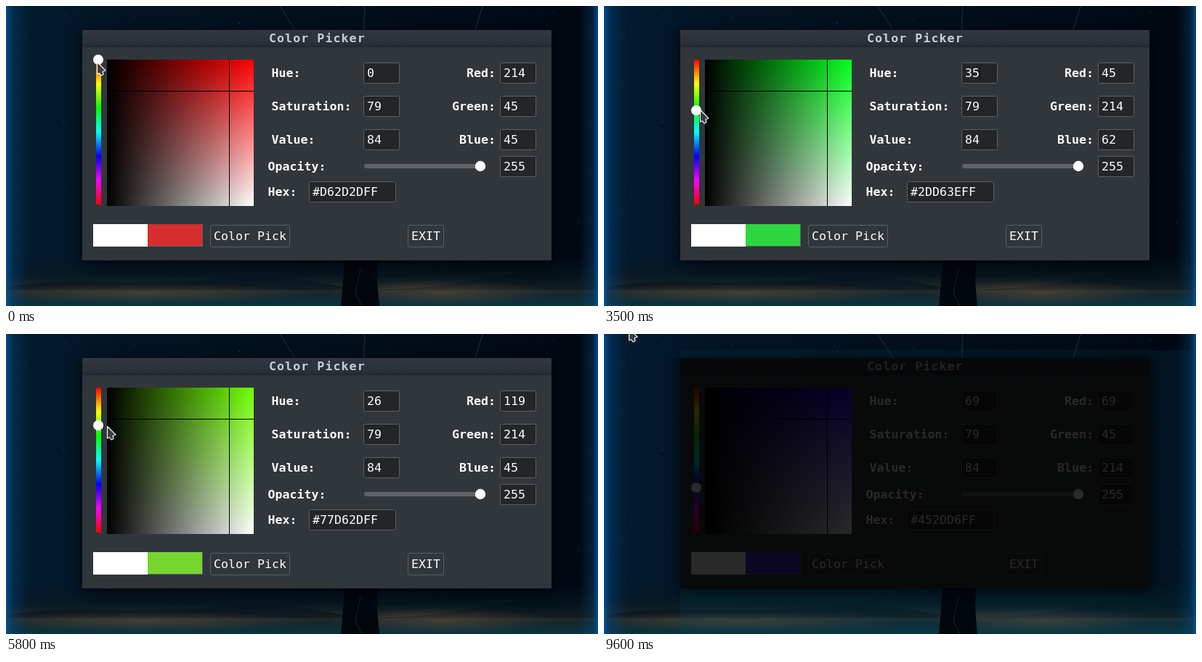
An HTML page that plays this animation: 815 by 414 pixels, repeating every 9.8 s.

```html
<!DOCTYPE html>
<html lang="en">
<head>
<meta charset="utf-8">
<title>Color Picker</title>
<style>
html, body { margin: 0; width: 100%; height: 100%; overflow: hidden; background: #010c18; }
svg { display: block; }
text { font: 16.6px "DejaVu Sans Mono", monospace; fill: #fcfcfc; white-space: pre; }
.b { font-weight: bold; }
.title { font-weight: bold; letter-spacing: 1.07px; fill: #c8cfdb; }
</style>
</head>
<body>
<svg width="815" height="414" viewBox="0 0 815 414">
  <defs>
    <linearGradient id="sky">
      <stop offset="0" stop-color="#021b30"/><stop offset=".2" stop-color="#021424"/>
      <stop offset=".65" stop-color="#020d19"/><stop offset="1" stop-color="#010812"/>
    </linearGradient>
    <linearGradient id="edge">
      <stop offset="0" stop-color="#07549a" stop-opacity=".85"/>
      <stop offset=".3" stop-color="#05457c" stop-opacity=".4"/>
      <stop offset="1" stop-color="#05457c" stop-opacity="0"/>
    </linearGradient>
    <linearGradient id="ground" x2="0" y2="1">
      <stop offset="0" stop-color="#03131d" stop-opacity="0"/>
      <stop offset=".45" stop-color="#0a1a20" stop-opacity=".7"/>
      <stop offset=".68" stop-color="#262a28"/>
      <stop offset=".8" stop-color="#12272f"/>
      <stop offset="1" stop-color="#0a3440"/>
    </linearGradient>
    <radialGradient id="warm">
      <stop offset="0" stop-color="#6b5440" stop-opacity=".5"/>
      <stop offset="1" stop-color="#6b5440" stop-opacity="0"/>
    </radialGradient>
    <linearGradient id="bar" x2="0" y2="1">
      <stop offset="0" stop-color="#31353f"/><stop offset=".7" stop-color="#2d313b"/>
      <stop offset="1" stop-color="#23272e"/>
    </linearGradient>
    <linearGradient id="rainbow" x2="0" y2="1">
      <stop offset="0" stop-color="#f00"/><stop offset=".1667" stop-color="#ff0"/>
      <stop offset=".3333" stop-color="#0f0"/><stop offset=".5" stop-color="#0ff"/>
      <stop offset=".6667" stop-color="#00f"/><stop offset=".8333" stop-color="#f0f"/>
      <stop offset="1" stop-color="#f00"/>
    </linearGradient>
    <linearGradient id="tint" x2="0" y2="1">
      <stop id="pure" offset="0"/><stop offset="1" stop-color="#fff"/>
    </linearGradient>
    <linearGradient id="shade">
      <stop offset="0"/><stop offset="1" stop-opacity="0"/>
    </linearGradient>
    <filter id="blur" x="-10%" y="-15%" width="120%" height="130%"><feGaussianBlur stdDeviation="9"/></filter>
  </defs>

  <rect width="815" height="414" fill="url(#sky)"/>
  <g id="stars" fill="#2d6476"></g>
  <path d="M377 0l21 33M493.500 0l-1 33M656 0l-10 33" stroke="#34434c" stroke-opacity=".7" fill="none"/>
  <rect y="340" width="815" height="74" fill="url(#ground)"/>
  <path d="M0 388Q60 378 130 381T290 377T450 385T640 379T815 368V392H0Z" fill="#03121b" opacity=".55"/>
  <ellipse cx="190" cy="397" rx="240" ry="14" fill="url(#warm)"/>
  <ellipse cx="600" cy="396" rx="160" ry="18" fill="url(#warm)"/>
  <rect width="32" height="414" fill="url(#edge)"/>
  <rect width="26" height="414" fill="url(#edge)" transform="matrix(-1 0 0 1 815 0)"/>
  <path id="glow" d="M105 22H815V414H105Z" fill="#034a60" opacity=".18"/>
  <path d="M467 345H512L511 380L514 414H461L463 392Z" fill="#02060d"/>
  <path d="M488 362l-7 34 9 18" stroke="#0a1622" stroke-width="2" fill="none"/>

  <rect x="103" y="35" width="650" height="320" fill="#000" opacity=".65" filter="url(#blur)"/>
  <rect x="105" y="33" width="646" height="318" fill="#31363b"/>
  <rect x="105" y="33" width="646" height="24" fill="url(#bar)"/>
  <text class="title" x="362" y="50">Color Picker</text>

  <rect x="124" y="74" width="7" height="200" fill="url(#rainbow)"/>
  <rect x="139" y="74" width="202" height="202" fill="url(#tint)"/>
  <rect x="139" y="74" width="202" height="202" fill="url(#shade)"/>
  <path d="M139 117.500H341M307.500 74V276" stroke="#000"/>
  <circle id="knob" cx="127" r="7" fill="#fff"/>

  <g id="form"></g>
  <rect x="493" y="218" width="160" height="6" rx="3" fill="#606468"/>
  <circle cx="653" cy="221" r="7.200" fill="#fff"/>
  <rect id="caret" y="84" width="1" height="18" fill="#08090a"/>

  <rect x="120" y="301" width="151" height="31" fill="#5b6064"/>
  <rect x="120" y="301" width="75" height="31" fill="#fff"/>
  <rect id="swatch" x="195" y="301" width="75" height="30"/>
  <rect id="dim" x="105" y="33" width="646" height="318" opacity=".84"/>
  <path id="cursor" d="M.5 .5V17L3.500 15.500L6 19L9 17.500L8 13.500L12 12Z" fill="#3a3d42" stroke="#f4f4f4" stroke-width="1.200" stroke-linejoin="round"/>
</svg>
<script>
const LOOP = 9800, STEP = 100, SAT = .79, VAL = .84;
const $ = id => document.getElementById(id);

function add(parent, tag, attrs, text) {
  const el = document.createElementNS("http://www.w3.org/2000/svg", tag);
  for (const key in attrs) el.setAttribute(key, attrs[key]);
  if (text) el.textContent = text;
  return parent.appendChild(el);
}

// Night sky specks
let seed = 7;
const rand = () => (seed = seed * 16807 % 2147483647) / 2147483647;
for (let i = 0; i < 420; i++) {
  const size = rand() < .1 ? 1.5 : .9;
  add($("stars"), "rect", { x: rand() * 815, y: rand() * 375, width: size, height: size, opacity: .15 + rand() * .5 });
}

// Labels, fields and buttons
const form = $("form");
const label = (x, y, text, anchor = "start") => add(form, "text", { x, y, class: "b", "text-anchor": anchor }, text);
function box(x, y, w, h, fill, text) {
  add(form, "rect", { x: x + .5, y: y + .5, width: w - 1, height: h - 1, rx: 2, fill, stroke: "#5b6064" });
  return add(form, "text", { x: x + 5, y: y + (h >> 1) + 6 }, text);
}
const field = (x, y, w, text) => box(x, y, w, 29, "#232629", text);

const rows = [78, 124, 170];
["Hue:", "Saturation:", "Value:"].forEach((s, i) => label(365.5, rows[i] + 20, s));
["Red:", "Green:", "Blue:"].forEach((s, i) => label(674, rows[i] + 20, s, "end"));
label(360.5, 227, "Opacity:");
label(360.5, 262, "Hex:");
const hueText = field(492, 78, 50, "0");
field(492, 124, 50, "79");
field(492, 170, 50, "84");
const rgbText = rows.map(y => field(680, y, 50, "0"));
field(680, 207, 50, "255");
const hexText = field(417, 242, 120, "#");
box(281, 302, 110, 31, "#31363b", "Color Pick");
box(553, 302, 50, 31, "#31363b", "EXIT");

// [time, hue, cursor x, cursor y]
const track = [
  [0, 0, 125, 77], [700, 0, 125, 77], [1400, 33, 125, 143], [1700, 43, 126, 163],
  [1750, 43, 126, 163], [2400, 55, 129, 186], [3100, 55, 129, 186], [3500, 35, 132, 143],
  [4100, 8, 142, 91], [4200, 8, 142, 91], [4300, 9, 142, 93], [4700, 14, 142, 103],
  [4800, 14, 142, 103], [5800, 26, 139, 127], [6200, 30, 136, 134], [6800, 21, 129, 117],
  [7000, 19, 127, 112], [7200, 19, 127, 112], [7800, 69, 127, 217], [8000, 69, 127, 217],
  [9000, 69, 38, 3], [9200, 69, 34, -8], [LOOP, 69, 34, -8]
];
const blinks = [1300, 2400, 5000, 6300, 9200];

function poseAt(t) {
  const i = track.findIndex(k => k[0] > t);
  const a = track[i - 1], b = track[i], p = (t - a[0]) / (b[0] - a[0]);
  return [1, 2, 3].map(n => Math.round(a[n] + (b[n] - a[n]) * p));
}

function hsv(h, s, v) {
  return [5, 3, 1].map(n => {
    const k = (n + h * 6) % 6;
    return Math.round(255 * v * (1 - s * Math.max(0, Math.min(k, 4 - k, 1))));
  });
}

function draw(time) {
  const t = Math.floor(time % LOOP / STEP) * STEP;
  const [hue, x, y] = poseAt(t);
  const rgb = hsv(hue / 100, SAT, VAL);
  const hex = "#" + rgb.map(c => c.toString(16).padStart(2, "0")).join("").toUpperCase();
  $("pure").setAttribute("stop-color", `rgb(${hsv(hue / 100, 1, 1)})`);
  $("knob").setAttribute("cy", 74 + 2 * hue);
  $("swatch").setAttribute("fill", hex);
  hueText.textContent = hue;
  rgbText.forEach((el, i) => el.textContent = rgb[i]);
  hexText.textContent = hex + "FF";

  const show = (id, on) => $(id).style.display = on ? "" : "none";
  $("caret").setAttribute("x", 497 + (hue ? 10 * String(hue).length : 0));
  show("caret", blinks.filter(b => b <= t).length % 2 === 0);
  show("dim", t >= 9600);
  show("glow", t >= 9600);
  $("cursor").setAttribute("transform", `translate(${x} ${y})`);
}

function tick() {
  draw(performance.now());
  requestAnimationFrame(tick);
}
tick();
</script>
</body>
</html>
```
